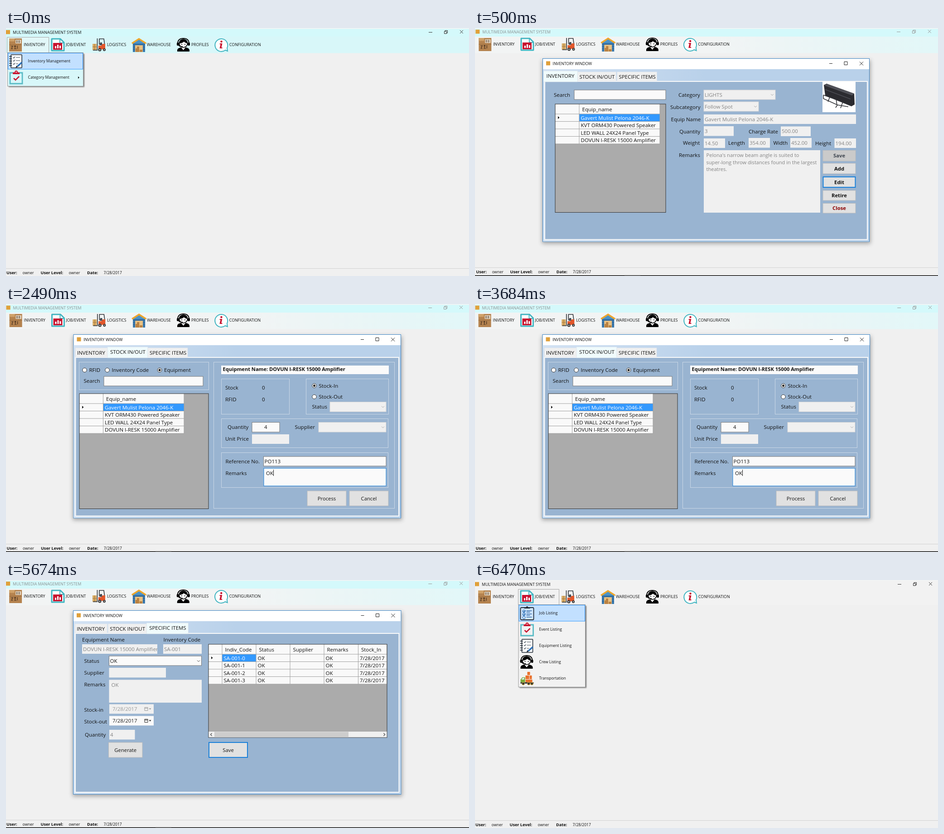
Animation of 1022x548 px, one loop 8 s. Source, as an HTML page:

```html
<!DOCTYPE html>
<html lang="en">
<head>
<meta charset="utf-8">
<title>Inventory walkthrough</title>
<style>
html, body { margin: 0; width: 100%; height: 100%; overflow: hidden; background: #f0f0f0; }
svg { display: block; }
body > svg { width: 1022px; height: 548px; }
text { font-family: "Open Sans", "Noto Sans", sans-serif; white-space: pre; }
</style>
</head>
<body>
<svg id="stage" viewBox="0 0 1022 548">
<defs>
  <linearGradient id="mist"><stop offset=".5" stop-color="#f2f4f4"/><stop offset="1" stop-color="#e2f7f8"/></linearGradient>
  <linearGradient id="strip"><stop offset="0" stop-color="#d3e2f3"/><stop offset=".5" stop-color="#b9d1ea"/></linearGradient>
  <filter id="soft" x="-10%" y="-10%" width="120%" height="120%"><feGaussianBlur stdDeviation="5"/></filter>
  <filter id="tight" x="-10%" y="-10%" width="120%" height="120%"><feGaussianBlur stdDeviation="1"/></filter>

  <g id="box">
    <path fill="#b5834f" d="M1 1h28v29H1z"/><path fill="#94683c" d="M1 14.500h28v1H1z"/>
    <path fill="#d0a26a" d="M1 1h12v7l-2-1-2 1-2-1-2 1-2-1-2 1z"/>
    <path fill="#eee2cf" d="M15 4h12v8H15z"/>
    <path stroke="#5b4634" d="M17 5v6m2-6v6m3-6v6m2-6v6"/>
    <path fill="none" stroke="#493220" stroke-width="1.200" d="M5 18h4l-2 3v3m-2 0h4M14 17v7m-2-5 2-2 2 2m-4 5h5m2-7v7"/>
  </g>
  <g id="doc">
    <path fill="#fff" stroke="#42b5c1" stroke-width="3" stroke-linejoin="round" d="M2 2h19l8 8v18H2z"/>
    <path fill="none" stroke="#42b5c1" stroke-width="2" d="M20 2v9h9"/>
    <path fill="#c8142f" d="M5 11h20v15H5z"/><path fill="#fff" d="M9 18h3v5H9zm5-3h3v8h-3zm5 2h3v6h-3z"/>
  </g>
  <g id="forklift">
    <path fill="#d9ad66" d="M0 13h9v6H0zm0 7h9v7H0z"/><path stroke="#a5783c" d="M0 19.5h9M4.500 13v14"/>
    <path fill="none" stroke="#30343a" stroke-width="1.600" d="M10.500 1v26H1M15 14V2h10l2 14"/>
    <path fill="#e2572b" d="M13 17h6l3-4h6v12H13z"/><path fill="#464b52" d="M17 10h4v6h-6z"/>
    <circle cx="16" cy="26" r="3.500" fill="#333"/><circle cx="26" cy="26" r="3" fill="#333"/>
    <circle cx="16" cy="26" r="1.500" fill="#ccc"/><circle cx="26" cy="26" r="1.200" fill="#ccc"/>
  </g>
  <g id="warehouse">
    <path fill="#3978ad" d="M2 11h27v20H2z"/><path stroke="#2b5d8c" d="M2 15h27M2 20h5m17 0h5M2 25h5m17 0h5"/>
    <path fill="#e9c284" d="M7 16h17v15H7z"/><path fill="#b98142" d="M8 23h8v8H8zm9 3h6v5h-6zm-6-7h5v4h-5z"/>
    <path fill="#4c93c7" d="M3 12 15.500 3 28 12z"/>
    <path fill="none" stroke="#eda62c" stroke-width="3.500" d="M0 12 15.500 2 31 12"/>
  </g>
  <g id="agent">
    <path d="M1 30v-3q0-4 7-6h13q7 2 7 6v3z"/>
    <path fill="#fff" d="m9 20 5.500 7 5.500-7z"/>
    <circle cx="14.500" cy="12" r="9" fill="#fff" stroke="#000" stroke-width="1.600"/>
    <path d="M5 12Q5 3 14.500 3T24 12q-6-1-8-4-4 4-11 4z"/>
    <path fill="none" stroke="#000" stroke-width="1.800" d="M2 11Q3 1 14.500 1T27 11M4 16q3 4 9 3"/>
    <rect x="0" y="10" width="5" height="7" rx="2"/><rect x="24" y="10" width="5" height="7" rx="2"/>
    <circle cx="11" cy="14" r="1.100"/><circle cx="18" cy="14" r="1.100"/>
  </g>
  <g id="info">
    <path fill="#fff" stroke="#42b5c1" stroke-width="2" d="M24 27a14 14 0 1 1 4-5l1 7z"/>
    <circle cx="15.500" cy="8" r="2.300" fill="#c8142f"/>
    <path fill="#c8142f" d="M12 12h5.500l-2 9h2v2h-6l2-9h-2z"/>
  </g>
  <g id="notebook">
    <rect x="4" y="1" width="24" height="29" rx="1" fill="#fff" stroke="#222b36" stroke-width="1.600"/>
    <path stroke="#222b36" stroke-width="1.300" d="M0 5h6M0 10h6M0 15h6M0 20h6M0 25h6"/>
    <path fill="none" stroke="#3a4652" stroke-width="1.200" d="m9 7 1.500 1.500L13 5m2 2h9M9 14l1.500 1.500L13 12m2 2h9M9 21l1.500 1.500L13 19m2 2h5"/>
    <path stroke="#2c70b7" stroke-width="3.500" d="m18 27 10-9"/><path fill="#222b36" d="m14 30 2-5 3 3z"/>
  </g>
  <g id="clip">
    <path fill="none" stroke="#5bbcc6" stroke-width="2.800" d="M8 5H2v24h27V5h-6"/>
    <path fill="#c8142f" d="M8 8V4h4q0-4 3.500-4T19 4h4v4z"/><circle cx="15.500" cy="3.500" r="1.200" fill="#fff"/>
    <path fill="none" stroke="#c8142f" stroke-width="2.600" d="m10 17 4 4 8-8"/>
  </g>
  <g id="checklist">
    <rect x="1" y="3" width="29" height="27" rx="2" fill="#cfe6ff" stroke="#222b36" stroke-width="1.800"/>
    <path fill="#222b36" d="M9 5V2h4q1-2 2.500-2T18 2h4v3z"/>
    <path stroke="#3e70a8" stroke-width="1.300" d="M14 10h12M14 13h8m-8 4h12m-12 3h8m-8 4h12"/>
    <g fill="#fff" stroke="#2c70b7" stroke-width="1.200"><circle cx="8.500" cy="11" r="2.600"/><circle cx="8.500" cy="18" r="2.600"/><circle cx="8.500" cy="25" r="2.600"/></g>
    <path fill="none" stroke="#2c70b7" stroke-width="1.300" d="m7 11 1.500 1.500L12 9m-5 9 1.500 1.500L12 16"/>
  </g>
  <g id="truck">
    <path fill="#e9712c" d="M12 9h8v8h-8zm9 0h5v8h-5zm-5-8h6v7h-6zm-4 17h15v6H12z"/>
    <path fill="#7cab3a" d="M1 25v-7l4-5h6v12z"/><path fill="#d8eef5" d="m3 18 3-4h3v4z"/>
    <path fill="#3c4148" d="M1 24h29v3H1z"/>
    <g fill="#333" stroke="#ddb43c"><circle cx="7" cy="27" r="3"/><circle cx="19" cy="27" r="3"/><circle cx="26" cy="27" r="3"/></g>
  </g>
</defs>
</svg>
<script>
const stage = document.getElementById("stage");
const BLUE = "#1a80d9", SELECTED = "#3399ff", GREY = "#838383", PALE = "#f0f0f0";

const rect = (x, y, x2, y2, fill, stroke = "none", sw = 1) =>
  `<rect x="${x}" y="${y}" width="${x2 - x}" height="${y2 - y}" fill="${fill}" stroke="${stroke}" stroke-width="${sw}"/>`;
const path = (d, stroke = "#222", sw = 1, fill = "none") =>
  `<path d="${d}" fill="${fill}" stroke="${stroke}" stroke-width="${sw}"/>`;
// Text is placed by its left edge and the middle of its capitals.
const text = (x, cy, s, { size = 11.5, fill = "#111", bold = false, mid = false } = {}) =>
  `<text x="${x}" y="${cy + size * .355}" font-size="${size}" fill="${fill}"${bold ? ' font-weight="700"' : ""}${mid ? ' text-anchor="middle"' : ""}>${s}</text>`;
const labels = list => list.map(([x, y, s]) => text(x, y, s)).join("");
const icon = (id, x, y) => `<use href="#${id}" x="${x}" y="${y}"/>`;

const appIcon = (x, y) => rect(x, y, x + 9, y + 9, "#e0a03a");

function field(x, y, x2, y2, value = "", { fill = PALE, stroke, sw, ink = GREY, dx = 2 } = {}) {
  const w = x2 - x, h = y2 - y;
  return rect(x, y, x2, y2, fill, stroke, sw) +
    `<svg x="${x}" y="${y}" width="${w}" height="${h}">${text(dx, Math.min(h / 2, 11), value, { fill: ink })}</svg>`;
}
const input = (x, y, x2, y2, value, dx) =>
  field(x, y, x2, y2, value, { fill: "#fafafa", stroke: "#7a7a7a", ink: "#111", dx });
const chevron = (x, y, color = "#aaa") => path(`M${x - 3} ${y - 1.5}l3 3 3-3`, color);
const combo = (x, y, x2, y2, value) =>
  field(x, y, x2, y2, value, { stroke: "#d5d5d5" }) + chevron(x2 - 7, (y + y2) / 2);

function button(x, y, x2, y2, label, { fill = "#111", face = "#e1e1e1", bold = false, focus = false } = {}) {
  return rect(x, y, x2, y2, face, focus ? BLUE : "#bcbcbc", focus ? 2 : 1) +
    text((x + x2) / 2, (y + y2) / 2, label, { size: 11.3, fill, bold, mid: true });
}
const group = (x, y, x2, y2) => rect(x + .5, y + .5, x2 - .5, y2 - .5, "none", "#cbd8e7");
const radio = (x, y, label, on) =>
  `<circle cx="${x}" cy="${y}" r="4.700" fill="#fff" stroke="#333"/>` +
  (on ? `<circle cx="${x}" cy="${y}" r="2.500" fill="#222"/>` : "") + text(x + 10, y, label);

function grid(x, y, x2, y2, headH, cols, heads, rows) {
  const step = 16.5, top = y + headH, end = cols[cols.length - 1], bottom = top + step * rows.length;
  let s = rect(x, y, x2, y2, "#ababab") + rect(x, y, end, bottom, "#f9f9f9") +
    rect(cols[0], top, cols[1], top + step, SELECTED);
  for (let i = 0; i <= rows.length; i++) s += path(`M${x} ${top + i * step}H${end}`, "#a0a0a0");
  cols.forEach(c => s += path(`M${c} ${y}V${bottom}`, "#a0a0a0"));
  heads.forEach((h, i) => s += text(cols[i] + 6.5, y + headH / 2 + .8, h));
  rows.forEach((row, r) => row.forEach((cell, i) =>
    s += text(cols[i] + 3.5, top + step * (r + .5) + .5, cell, { fill: r + i ? "#111" : "#fff" })));
  return s + path(`M${x + 6} ${top + 5}l3.500 3-3.500 3z`, "none", 0, "#111") + rect(x, y, x2, y2, "none", "#333");
}

const MENU = [
  ["box", 6, 22, 39, "INVENTORY"], ["doc", 99, 22, 132, "JOB/EVENT"],
  ["forklift", 191, 22, 223, "LOGISTICS"], ["warehouse", 278, 22, 311, "WAREHOUSE"],
  ["agent", 377, 22, 409, "PROFILES"], ["info", 460, 22, 493, "CONFIGURATION"]];

function chrome({ menuFill, titleFill = "#d4f9fb", matrix = "1 0 0 1 0 0", active = true, openTab = "" }) {
  const ink = active ? "#111" : "#8a9090", small = { size: 8.5 }, bold = { size: 9.15, bold: true };
  return rect(0, 0, 1022, 548, PALE) + rect(0, 1.5, 1022, 19, titleFill) + rect(0, 19, 1022, 55.5, menuFill) +
    rect(0, 0, 1022, 1.5, "#f4f6f6") +
    `<g transform="matrix(${matrix})">` + openTab +
    appIcon(0, 4.500) + text(15, 9.500, "MULTIMEDIA MANAGEMENT SYSTEM", { size: 8.8, fill: ink }) +
    path("M933 9.500h8M967.500 7.500h5v5h-5zM969 7V5.500h5.500v5.500H973M1002 5l7 7m0-7-7 7", active ? "#333" : "#999") +
    MENU.map(([id, x, y, tx, s]) => icon(id, x, y) + text(tx, 37, s, { size: 8.75 })).join("") +
    path("M-4 531.500H1030", "#d2d2d2") +
    text(1, 540.500, "User:", bold) + text(36.500, 540.500, "owner", small) +
    text(76.500, 540.500, "User Level:", bold) + text(138.500, 540.500, "owner", small) +
    text(179, 540.500, "Date:", bold) + text(215.500, 540.500, "7/28/2017", small) + "</g>" +
    (active ? "" : rect(0, 546.5, 1022, 548, "#111") + rect(330, 546.5, 365, 548, "#555"));
}

function dropdown(x, x2, fill, textX, items) {
  const bottom = 56.5 + items.length * 36;
  return `<g filter="url(#tight)" opacity=".6">${rect(x + 3, 57, x2 + 2, bottom + 2, "#333")}</g>` +
    rect(x + .5, 54.5, x2 - .5, bottom, fill, "#999") + rect(x + 1.5, 55.5, x2 - 1.5, 91, "#c2e0ff", "#3399ff") +
    items.map(([id, s], i) => icon(id, x + 4, 58 + i * 36) + text(textX, 73 + i * 36, s, { size: 8.6 })).join("");
}
const tabBox = (x, x2, fill) => path(`M${x + .5} 55V20.500H${x2 - .5}V54`, "#a5a5a5", 1, fill);

const TABS = ["INVENTORY", "STOCK IN/OUT", "SPECIFIC ITEMS"];
const TAB_EDGES = [[153, 224], [226, 311], [313, 401]];

function dialog(x, x2, y2, selected, tabShift, content) {
  let s = `<g filter="url(#soft)" opacity=".4">${rect(x - 1, 71, x2 + 2, y2 + 4, "#333")}</g>` +
    rect(x + .5, 67.5, x2 - .5, y2 - .5, "#fff", "#3d85c6") + rect(x + 1, 91, x2 - 1, y2 - 1, "url(#strip)") +
    appIcon(x + 8, 73.5) + text(x + 22.5, 79, "INVENTORY WINDOW", { size: 8.6 }) +
    path(`M${x2 - 89} 78.500h7M${x2 - 56} 74.500h7v7h-7zM${x2 - 22} 74.500l8 8m0-8-8 8`, "#222") +
    rect(x + 5, 118, x2 - 5, y2 - 5, "#99b4d1", "#fafafa", 2);
  TABS.forEach((name, i) => {
    const [a, b] = TAB_EDGES[i], on = i === selected, grow = on ? 2 : 0;
    s += rect(a + tabShift - grow, on ? 95 : 97, b + tabShift + grow, on ? 119 : 117, on ? "#f0fbfc" : PALE, "#dce3ea", .7) +
      text(a + 4 + tabShift, on ? 106 : 107.5, name, { size: 11.4 });
  });
  return s + content;
}

const LIGHT = "Gavert Mulist Pelona 2046-K", AMP = "DOVUN I-RESK 15000 Amplifier";
const ITEMS = [LIGHT, "KVT ORM430 Powered Speaker", "LED WALL 24X24 Panel Type", AMP].map(s => [s]);

const spotlight = rect(767, 119, 840, 186, "#fff") +
  path("M770 126l6-3 61 22 1 24-7 4-58-24z", "none", 0, "#2b2b30") +
  path("M776 123l61 22-5 4-61-22z", "none", 0, "#505158") + path("M773 136l56 21", "#4b4c53", 1.5) +
  path("M769 148l22 8 40 16M769 148v8l31 14 24 4M783 153l-4 10M797 157l2 13M812 163l-5 14M800 170l-4 6", "#303136", 1.6);

const inventory = () =>
  labels([[174, 147.5, "Search"], [449, 148, "Category"], [431, 174.5, "Subcategory"], [432.5, 202, "Equip Name"],
    [451, 228.5, "Quantity"], [604, 228.5, "Charge Rate"], [459, 254, "Weight"], [559, 254, "Length"],
    [658.5, 254, "Width"], [751, 254.5, "Height"], [450, 281, "Remarks"]]) +
  input(219, 137, 421, 158) +
  grid(177, 168, 421, 407.5, 22, [230, 408], ["Equip_name"], ITEMS) +
  combo(505, 137, 663, 158, "LIGHTS") + combo(505, 163, 626, 184, "Follow Spot") +
  field(505, 191, 841, 212, LIGHT) + field(505, 217, 571, 238.5, "3") + field(675, 217.5, 741, 239, "500.00") +
  field(505, 244, 552, 265, "14.50") + field(604, 243, 651, 264.5, "354.00") +
  field(696, 243, 743, 264.5, "452.00") + field(793.5, 244, 841, 265, "194.00") +
  rect(505, 270, 762, 408, PALE) +
  ["Pelona's narrow beam angle is suited to", "super-long throw distances found in the largest", "theatres."]
    .map((s, i) => text(510.5, 281 + i * 15.7, s, { size: 11.1, fill: GREY })).join("") +
  spotlight +
  button(768, 270.5, 840, 294, "Save", { bold: true, fill: "#3f4650", face: "#cacaca" }) +
  button(768, 299, 840, 322, "Add", { bold: true }) +
  button(768.5, 329, 839.5, 352, "Edit", { bold: true, focus: true }) +
  button(768, 359, 840, 381, "Retire", { bold: true }) +
  button(768, 387.5, 840, 409, "Close", { bold: true, fill: "#8b0000" });

const stock = () =>
  group(161, 128, 448, 190) + group(458, 128, 858, 452) + group(475, 165, 626, 244) + group(662, 165, 845, 244) +
  group(475, 253, 844, 318) + group(475, 328, 844, 406) +
  radio(173.5, 146, "RFID") + radio(223.5, 146, "Inventory Code") + radio(339, 146, "Equipment", true) +
  radio(680.5, 180.5, "Stock-In", true) + radio(680.5, 205, "Stock-Out") +
  labels([[171.5, 170, "Search"], [484, 184.5, "Stock"], [565, 184.5, "0"], [484, 211, "RFID"], [565, 211, "0"],
    [675.5, 227, "Status"], [489, 272, "Quantity"], [637.5, 272, "Supplier"], [484, 298, "Unit Price"],
    [484.5, 347.5, "Reference No."], [484.5, 373.5, "Remarks"]]) +
  input(216, 160, 435, 181) +
  grid(162, 198, 447, 452.5, 22, [214.5, 393], ["Equip_name"], ITEMS) +
  rect(475, 136, 845, 155, "#fafafa") + text(478.5, 144.5, "Equipment Name: " + AMP, { size: 11.1, bold: true }) +
  combo(715, 216.5, 839, 238) + combo(690, 261.5, 839, 283) +
  input(543, 261.5, 604, 283, "4", 27) + field(543, 288, 625, 309) + input(568.5, 337, 839, 358, "PO113") +
  field(569, 363, 839, 402, "OK", { fill: "#fafafa", stroke: BLUE, ink: "#111", dx: 5 }) + path("M590.500 366v14") +
  button(665, 413, 751, 446, "Process") + button(758, 413, 844, 446, "Cancel");

function picker(y, ink, fill) {
  return field(228, y, 326, y + 21, "7/28/2017", { fill, ink, dx: 7 }) +
    path(`M306 ${y + 7}h7v7h-7zM306 ${y + 9}h7`, ink) + path(`M315.500 ${y + 9}h5l-2.500 3z`, "none", 0, ink);
}
const specific = () =>
  labels([[168, 132, "Equipment Name"], [347.5, 132, "Inventory Code"], [172.5, 179, "Status"], [172.5, 205, "Supplier"],
    [172.5, 231, "Remarks"], [172.5, 287, "Stock-in"], [172.5, 313, "Stock-out"], [174, 342, "Quantity"]]) +
  field(168, 142, 334, 163, AMP) + field(347, 142, 432, 163, "SA-001") +
  input(227.5, 168, 431.5, 189, "OK") + chevron(425, 179, "#444") +
  field(227.5, 194, 353, 215.5) + field(227.5, 220.5, 432, 271, "OK", { dx: 5 }) +
  picker(274.5, "#9a9a9a", PALE) + picker(300.5, "#222", "#fafafa") + field(228, 331, 284.5, 352.5, "4") +
  grid(447, 142, 841, 348, 22, [477, 552, 627, 702, 777.5, 841],
    ["Indiv_Code", "Status", "Supplier", "Remarks", "Stock_In"],
    [0, 1, 2, 3].map(n => ["SA-001-" + n, "OK", "", "OK", "7/28/2017"])) +
  rect(447.5, 335, 840.5, 347.5, PALE) + rect(460, 335.5, 756, 347.5, "#cdcdcd") +
  path("M454.500 338.500l-3 3 3 3M833.500 338.500l3 3-3 3", "#444", 1.3) +
  button(226.5, 359, 301, 392, "Generate") + button(448, 359, 533, 392, "Save", { focus: true });

const MIST = "url(#mist)", CYAN = "#d8f7f9", PLAIN = "#f2f2f2";
const backdrop = matrix => chrome({ menuFill: MIST, active: false, matrix });
const scenes = [
  [0, chrome({ menuFill: CYAN, openTab: tabBox(2, 95, "#e2f7f8") }) +
    dropdown(3, 171, CYAN, 48.5, [["notebook", "Inventory Management"], ["clip", "Category Management"]]) +
    path("M159 107l3 2.500-3 2.500z", "none", 0, "#111")],
  [500, backdrop(".9965 0 0 .998 1.3 -.9") + dialog(149, 871, 472.5, 0, .5, inventory())],
  [2490, backdrop(".9985 0 0 1 .6 -1") + dialog(148.5, 872, 473.5, 1, 0, stock())],
  [4480, backdrop(".9992 0 0 1 .1 -1") + dialog(148, 872.5, 474, 2, -.8, specific())],
  [6470, chrome({ menuFill: PLAIN, titleFill: PLAIN, openTab: tabBox(95, 186, PLAIN) }) +
    dropdown(95.5, 244, PLAIN, 141.5, [["checklist", "Job Listing"], ["clip", "Event Listing"],
      ["notebook", "Equipment Listing"], ["agent", "Crew Listing"], ["truck", "Transportation"]])]
].map(([start, markup]) => {
  const node = document.createElementNS("http://www.w3.org/2000/svg", "g");
  node.innerHTML = markup;
  stage.append(node);
  return { start, node };
});

const origin = performance.now();
function update() {
  const t = (performance.now() - origin) % 8000;
  const current = scenes.filter(s => s.start <= t).pop();
  scenes.forEach(s => s.node.style.display = s === current ? "" : "none");
  requestAnimationFrame(update);
}
update();
</script>
</body>
</html>
```
